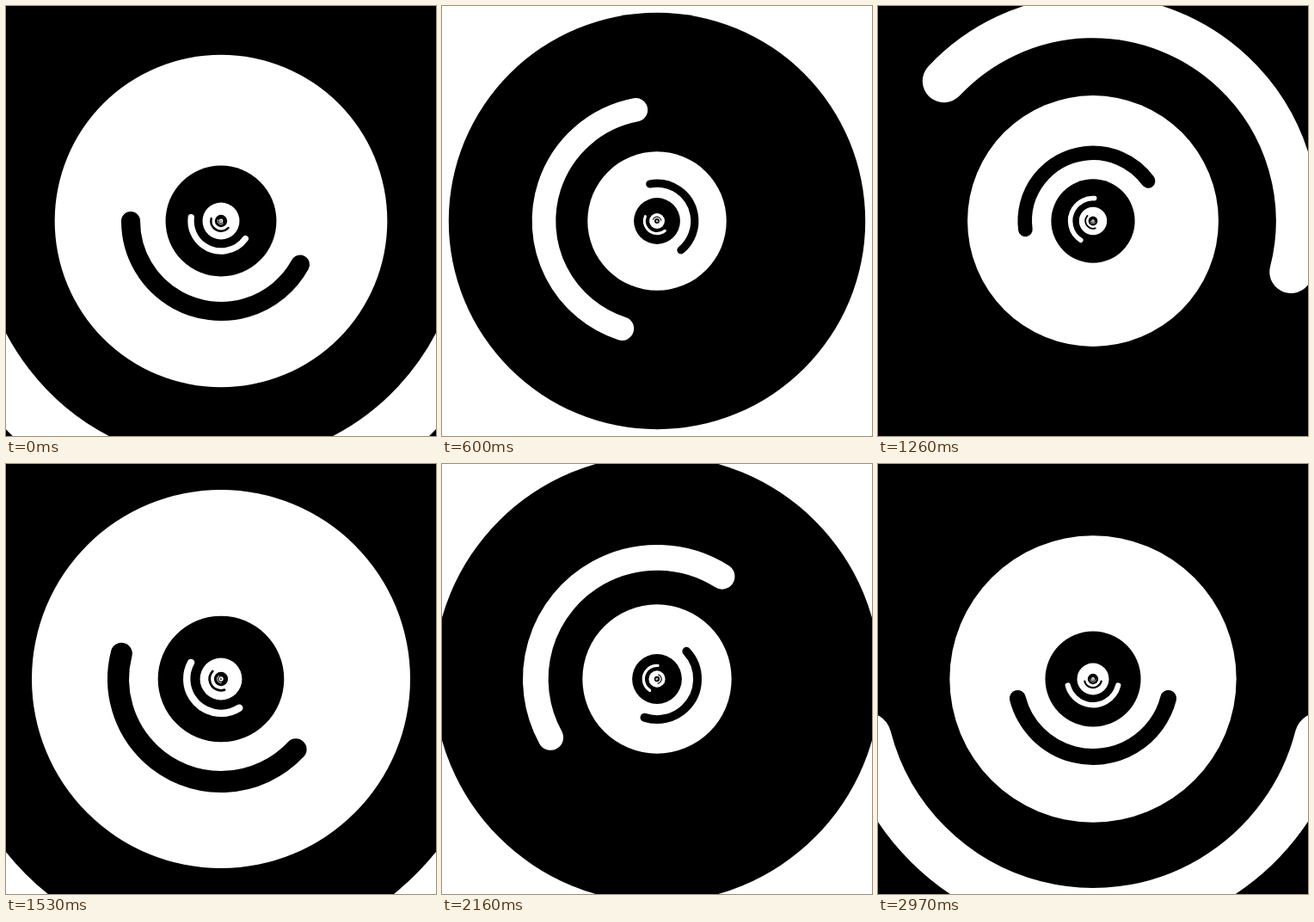
These frames come from a looping animation (500 by 500 pixels, 3000 ms). An HTML page with a canvas:

```html
<!DOCTYPE html>
<html lang="en">
<head>
<meta charset="utf-8">
<title>Endless nested discs</title>
<style>
  html, body { margin: 0; width: 100%; height: 100%; overflow: hidden; background: #000; }
  canvas { display: block; width: 500px; height: 500px; }
</style>
</head>
<body>
<canvas id="stage" width="500" height="500"></canvas>
<script>
const ctx = document.getElementById('stage').getContext('2d');
const TURN = 2 * Math.PI;
const STEP = 30;           // ms per picture
const STEPS = 50;          // pictures per zoom cycle
const DEPTH = 11;
const HALF_ARC = 0.21 * TURN;

function drawDisc(level, progress) {
  const radius = 500 * (1 + 8 * progress) / 3 ** (level - 1);
  const middle = TURN * (0.25 + level * progress);
  const [fill, line] = level % 2 ? ['#000', '#fff'] : ['#fff', '#000'];

  ctx.fillStyle = fill;
  ctx.beginPath();
  ctx.arc(250, 250, radius, 0, TURN);
  ctx.fill();

  ctx.strokeStyle = line;
  ctx.lineWidth = radius * 0.114;
  ctx.beginPath();
  ctx.arc(250, 250, radius * 0.543, middle - HALF_ARC, middle + HALF_ARC);
  ctx.stroke();
}

function render() {
  // The small slack absorbs timer jitter at step boundaries.
  const step = Math.floor(performance.now() / STEP + 0.1) + 1;
  const progress = step % STEPS / STEPS;
  for (let level = 1; level <= DEPTH; level++) drawDisc(level, progress);
  requestAnimationFrame(render);
}

ctx.lineCap = 'round';
render();
</script>
</body>
</html>
```
